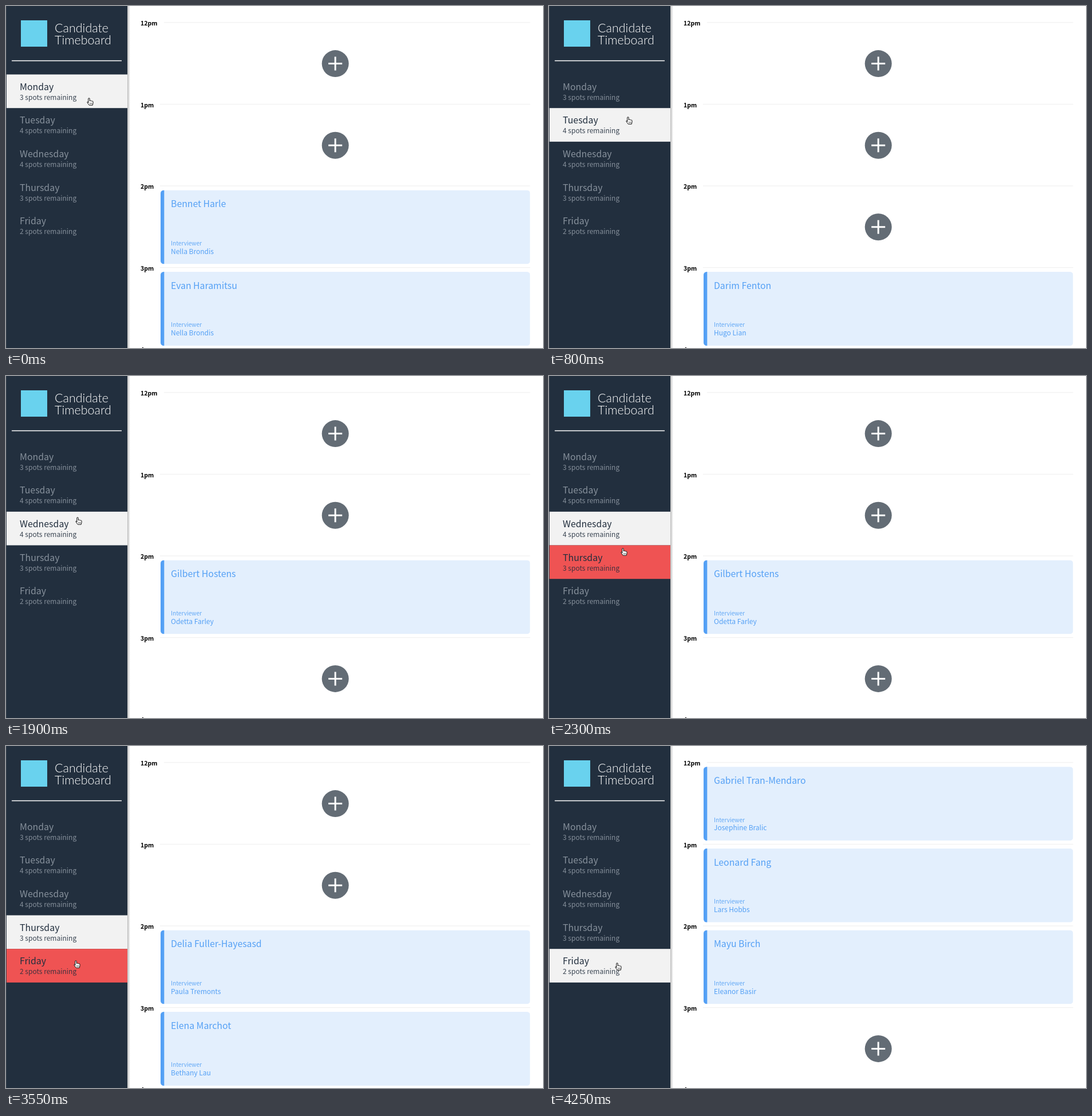
An HTML page that plays this animation: 938x597 px, repeating every 4420 ms.

```html
<!DOCTYPE html>
<html lang="en">
<head>
<meta charset="utf-8">
<title>Week planner</title>
<style>
  html, body { margin: 0; width: 100%; height: 100%; overflow: hidden; background: #fff; }
  svg { display: block; font-family: "Noto Sans CJK JP", "Noto Sans CJK SC", "Noto Sans CJK", "Open Sans", sans-serif; }
  .title { font: 300 21.5px Lato, sans-serif; fill: #fff; }
  .day { font-size: 15.9px; fill: #87919c; }
  .spots { font-size: 12px; font-weight: 300; fill: #858f9a; }
  .row rect { fill: none; }
  .hover rect { fill: #ef5353; }
  .hover .day { fill: #222f3e; }
  .hover .spots { fill: #43323f; }
  .selected rect { fill: #f2f2f2; }
  .selected .day { fill: #222f3e; }
  .selected .spots { fill: #3a4552; }
  .hour { font-size: 10.6px; font-weight: 700; fill: #000; }
  .student { font-size: 15.8px; fill: #54a0f5; }
  .label { font-size: 10.15px; font-weight: 300; fill: #62a8f5; }
  .interviewer { font-size: 12px; font-weight: 500; fill: #54a0f5; }
</style>
</head>
<body>
<svg id="stage" width="938" height="597" viewBox="0 0 938 597"></svg>
<script>
const LOOP = 4420, TICK = 50;
const ROW_TOP = 119.5, ROW_H = 58.67;
const SLOT_H = 142.6;

// Booked slots per day: slot index -> [student, interviewer]
const days = [
  { name: "Monday", spots: 3, booked: { 2: ["Bennet Harle", "Nella Brondis"], 3: ["Evan Haramitsu", "Nella Brondis"] } },
  { name: "Tuesday", spots: 4, booked: { 3: ["Darim Fenton", "Hugo Lian"] } },
  { name: "Wednesday", spots: 4, booked: { 2: ["Gilbert Hostens", "Odetta Farley"] } },
  { name: "Thursday", spots: 3, booked: { 2: ["Delia Fuller-Hayesasd", "Paula Tremonts"], 3: ["Elena Marchot", "Bethany Lau"] } },
  { name: "Friday", spots: 2, booked: { 0: ["Gabriel Tran-Mendaro", "Josephine Bralic"], 1: ["Leonard Fang", "Lars Hobbs"], 2: ["Mayu Birch", "Eleanor Basir"] } }
];

// Times at which each following day is clicked
const clicks = [800, 1900, 2950, 4200];

// Pointer path: time, x, y
const path = [
  [0, 147, 167], [250, 147, 167], [550, 140, 200], [900, 140, 200],
  [1450, 127, 253], [1900, 127, 253], [2300, 131, 307], [2400, 127, 319],
  [2550, 121, 328], [3000, 121, 328], [3450, 127, 377], [3550, 124, 381],
  [3700, 121, 385], [LOOP, 121, 385]
];

const text = (cls, x, y, str) => `<text class="${cls}" x="${x}" y="${y}">${str}</text>`;
const rect = (x, y, w, h, fill) => `<rect x="${x}" y="${y}" width="${w}" height="${h}" fill="${fill}"/>`;

function addButton(i) {
  const y = 100.6 + SLOT_H * i;
  return `<circle cx="575.2" cy="${y}" r="23.5" fill="#636c75"/>` +
    `<path d="M563.2 ${y}h24M575.2 ${y - 12}v24" stroke="#fff" stroke-width="3"/>`;
}

function card(i, [student, interviewer]) {
  const y = 36.2 + SLOT_H * i;
  return `<g clip-path="url(#round)" transform="translate(0 ${y})">` +
    rect(270, 0, 645.5, 129, "#e3effd") + rect(270, 0, 6.3, 129, "#54a0f5") + "</g>" +
    text("student", 288, y + 30, student) +
    text("label", 288, y + 96.4, "Interviewer") +
    text("interviewer", 288, y + 111.2, interviewer);
}

function schedule({ booked }) {
  return [0, 1, 2, 3].map(i => booked[i] ? card(i, booked[i]) : addButton(i)).join("");
}

function dayRow({ name, spots }, i) {
  const y = ROW_TOP + ROW_H * i;
  return `<g class="row"><rect x="1" y="${y}" width="211" height="${ROW_H}"/>` +
    text("day", 24, y + 27.3, name) +
    text("spots", 24, y + 44.2, `${spots} spots remaining`) + "</g>";
}

function hourMark(hour, i) {
  const x = i ? 269 : 276, y = 28.8 + SLOT_H * i;
  return text("hour", 235, y + 5.2, hour) + rect(x, y - 0.5, 915.5 - x, 1, "#eeeeee");
}

const stage = document.getElementById("stage");
stage.innerHTML = `
  <defs>
    <clipPath id="round"><rect x="270" y="0" width="645.5" height="129" rx="5.5"/></clipPath>
    <linearGradient id="shade">
      <stop offset="0" stop-color="#000" stop-opacity=".26"/>
      <stop offset="1" stop-color="#000" stop-opacity="0"/>
    </linearGradient>
  </defs>
  ${rect(0, 0, 938, 597, "#fff")}
  ${["12pm", "1pm", "2pm", "3pm", "4pm"].map(hourMark).join("")}
  <g id="slots"></g>
  ${rect(212, 0, 5, 597, "url(#shade)")}
  ${rect(0, 0, 212, 597, "#222f3e")}
  ${rect(0, 0, 1, 597, "#39424e")}
  ${rect(26, 25, 46, 46, "#69d2ee")}
  ${text("title", 85, 46, "Candidate")}
  ${text("title", 85, 67.3, "Timeboard")}
  ${rect(10, 94.8, 192, 1.5, "#fff")}
  ${days.map(dayRow).join("")}
  <g id="pointer" stroke="#111" stroke-linejoin="round" stroke-linecap="round">
    <path fill="#fff" d="M-3.2 1.6V-5a1.2 1.2 0 0 1 2.4 0V-1.2a1.1 1.1 0 0 1 2.1 .2a1.1 1.1 0 0 1 2 .5a1 1 0 0 1 1.8 .6V2.6L4.2 6.2H-1.6L-5 1.6a1 1 0 0 1 1.8 -1Z"/>
    <path stroke-width=".6" d="M-.4 2.2v2M1.3 2.2v2M3 2.2v2"/>
  </g>`;

const slots = document.getElementById("slots");
const pointer = document.getElementById("pointer");
const rows = [...stage.querySelectorAll(".row")];
let shown = -1;

function pointerAt(t) {
  const k = path.findIndex(p => p[0] > t);
  const [t0, x0, y0] = path[k - 1], [t1, x1, y1] = path[k];
  const p = (t - t0) / (t1 - t0);
  return [x0 + (x1 - x0) * p, y0 + (y1 - y0) * p];
}

function draw(ms) {
  const t = Math.floor(ms % LOOP / TICK) * TICK;
  const selected = clicks.filter(c => t >= c).length;
  const [x, y] = pointerAt(t);
  const hovered = Math.floor((y - 6 - ROW_TOP) / ROW_H);

  pointer.setAttribute("transform", `translate(${x} ${y})`);
  rows.forEach((row, i) => {
    const state = i === selected ? " selected" : i === hovered ? " hover" : "";
    row.setAttribute("class", "row" + state);
  });
  if (selected !== shown) {
    slots.innerHTML = schedule(days[selected]);
    shown = selected;
  }
}

const start = performance.now();
function frame() {
  draw(performance.now() - start);
  requestAnimationFrame(frame);
}
frame();
</script>
</body>
</html>
```
